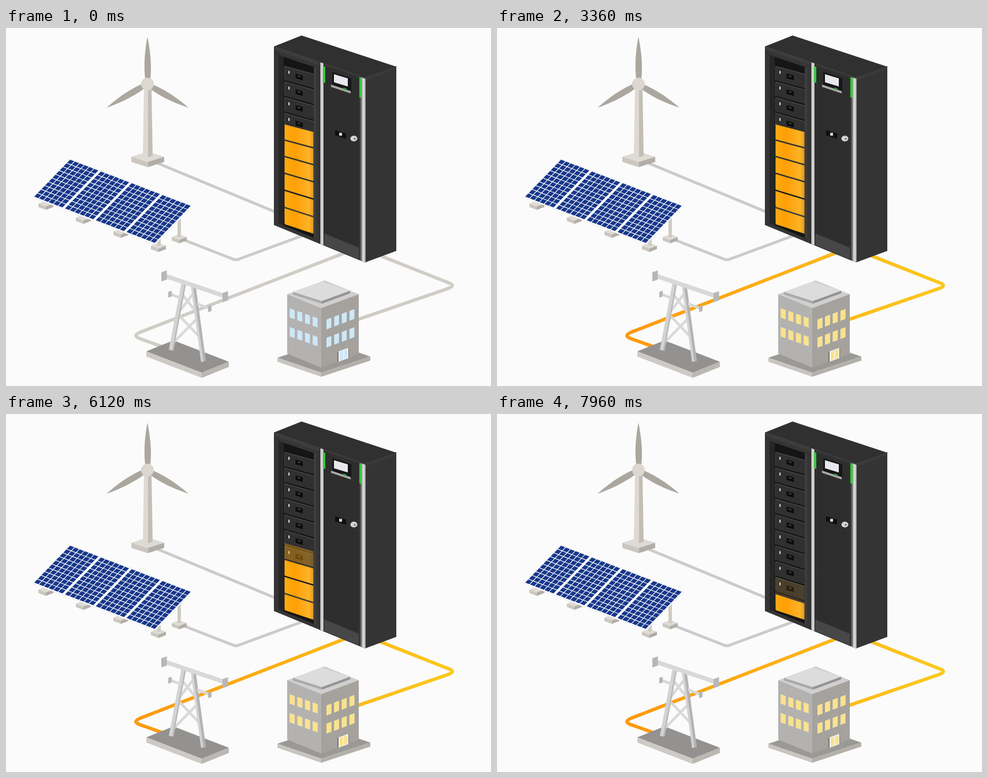
An HTML page for the animation above (8000 ms loop, 840x620 px).

```html
<!DOCTYPE html>
<html lang="en">
<head>
<meta charset="utf-8">
<title>Energy storage</title>
<style>
html, body { margin: 0; width: 100%; height: 100%; overflow: hidden; background: #fbfbfb; }
svg { display: block; width: 840px; height: 620px; }
</style>
</head>
<body>
<svg id="stage" viewBox="0 0 840 620" xmlns="http://www.w3.org/2000/svg">
  <defs>
    <linearGradient id="flow" gradientUnits="userSpaceOnUse" x1="222" y1="0" x2="774" y2="0">
      <stop offset="0" stop-color="#ff980a"/><stop offset="1" stop-color="#fcca1a"/>
    </linearGradient>
    <linearGradient id="charge">
      <stop offset="0" stop-color="#fbac12"/><stop offset=".35" stop-color="#ff9f06"/>
      <stop offset=".85" stop-color="#fdb327"/><stop offset="1" stop-color="#dc9a20"/>
    </linearGradient>
    <linearGradient id="post">
      <stop offset="0" stop-color="#8f8f8f"/><stop offset=".45" stop-color="#dedede"/><stop offset="1" stop-color="#b9b9b9"/>
    </linearGradient>
    <pattern id="mesh" width="3" height="3" patternUnits="userSpaceOnUse">
      <rect width="3" height="3" fill="#2a2a2a"/><rect width="1.5" height="1.5" fill="#383838"/>
    </pattern>
  </defs>
</svg>
<script>
const stage = document.getElementById('stage');

function add(tag, attrs, parent = stage) {
  const node = document.createElementNS('http://www.w3.org/2000/svg', tag);
  for (const key in attrs) node.setAttribute(key, attrs[key]);
  return parent.appendChild(node);
}
const poly = (points, fill, parent) => add('polygon', { points, fill }, parent);
const line = (d, stroke, width, more) =>
  add('path', { d, stroke, fill: 'none', 'stroke-width': width, ...more });

// Upright parallelogram whose top and bottom edges share a slope
const pane = (x, y, w, h, slope, fill, parent) =>
  poly([x, y, x + w, y + w * slope, x + w, y + w * slope + h, x, y + h], fill, parent);

// Box from the left, right and front corners of its top face
function slab([lx, ly], [rx, ry], [fx, fy], h, [top, left, right]) {
  poly([lx, ly, lx + rx - fx, ly + ry - fy, rx, ry, fx, fy], top);
  pane(lx, ly, fx - lx, h, (fy - ly) / (fx - lx), left);
  pane(fx, fy, rx - fx, h, (ry - fy) / (rx - fx), right);
}
const plinth = (x, y, w, d, h) =>
  slab([x - w, y], [x + w, y], [x, y + d], h, ['#dedad5', '#cbc7c0', '#b2aea7']);

function drawCables() {
  line('M255 231L470 320', '#cbcbcb', 5);
  line('M308 367L390 399Q397 403 404 400L515 359', '#cbcbcb', 5);
  return [
    'M593 387L232 527Q218 533 232 538L274 553',
    'M622 384L766 441Q780 446 766 451L603 507'
  ].map(d => {
    line(d, '#d0ccc6', 5.7);
    return line(d, 'url(#flow)', 5.7, { pathLength: 1, 'stroke-dasharray': '1 2' });
  });
}

function drawTurbine() {
  plinth(245.5, 223, 28.5, 9, 9);
  poly('239,104 246,104 246,224 237,221', '#dedad3');
  poly('246,104 252,104 254,221 246,224', '#c3beb5');
  for (const turn of [0, 120, 240]) {
    const blade = add('g', { transform: `rotate(${turn} 245 97)` });
    add('path', { d: 'M245 15C249 35 253 62 250 88H241C238 62 241 35 245 15Z', fill: '#aba79f' }, blade);
  }
  add('circle', { cx: 245, cy: 97, r: 11, fill: '#dcd7d0' });
}

function drawSolar() {
  for (let i = 0; i < 4; i++) plinth(69 + 65 * i, 304 + 24.3 * i, 13, 5, 6);
  plinth(300, 362, 13, 5, 6);
  pane(297, 320, 6, 42, 0, '#cfcbc4');
  pane(262, 356, 6, 21, 0, '#cfcbc4');

  // Unit square laid along the array's two edges
  const at = (u, v) => `${111 + 210 * u - 63 * v} ${228 + 80.5 * u + 65 * v}`;
  const quad = (u, v, du, dv) => `M${at(u, v)}L${at(u + du, v)}L${at(u + du, v + dv)}L${at(u, v + dv)}Z`;
  add('path', { d: quad(-.006, -.015, 1.012, 1.03), fill: '#fff', stroke: '#e2e2e2', 'stroke-width': .7 });
  const panels = 4, cols = 6, rows = 10, gap = .015, fill = .86;
  const du = ((1 + gap) / panels - gap) / cols, dv = 1 / rows;
  let cells = '';
  for (let p = 0; p < panels; p++)
    for (let c = 0; c < cols; c++)
      for (let r = 0; r < rows; r++)
        cells += quad(p * (1 + gap) / panels + c * du, r * dv, du * fill, dv * fill);
  add('path', { d: cells, fill: '#17378a' });
}

function drawPylon() {
  slab([243, 560], [386, 578], [339, 597], 9, ['#949290', '#cdcac5', '#bbb8b3']);
  line('M298 496L337 537M289 546L333 501M304 460L329 491M301 490L326 458', '#d9d9d9', 4.5);
  line('M308 441L286 558', '#d3d3d3', 8);
  line('M311 441L289 558', '#b9b9b9', 2.5);
  line('M322 444L340 578', '#d3d3d3', 4.5);
  line('M326 444L344 577', '#b3b3b3', 4.5);
  const arm = (x, y, w, h, slope, drops) => {
    pane(x, y, w, h, slope, '#d8d8d8');
    for (const dx of drops) pane(x + dx, y + dx * slope, h * 1.2, h * 2, -.35, '#b7b7b7');
  };
  arm(281, 457, 23, 5, .38, [0]);
  arm(331, 475, 25, 5, .38, [19]);
  arm(269, 423, 115, 8, .34, [0, 106]);
}

function drawBuilding() {
  slab([470, 571], [631, 569], [546, 597], 7, ['#9b9995', '#c8c5c0', '#b3b0aa']);
  slab([487, 461], [611, 461], [546, 485], 103, ['#cfcfcf', '#b3b2b1', '#a5a29e']);
  slab([497, 457], [596, 455], [547, 473], 4.5, ['#dcdcdc', '#aaaaaa', '#949494']);
  pane(574, 561, 20, 17, -.37, '#77746f');
  pane(576, 560, 17, 18, -.37, '#f2f4f5');
  const windows = (color, parent) => {
    for (let c = 0; c < 4; c++)
      for (let r = 0; r < 2; r++) {
        pane(491.5 + 13.2 * c, 485.5 + 4.7 * c + 32.5 * r, 8.5, 16, .34, color, parent);
        pane(555 + 13.3 * c, 505 - 5 * c + 31.5 * r, 8.5, 17, -.37, color, parent);
      }
    for (let d = 0; d < 2; d++) pane(578 + 7.5 * d, 561 - 2.8 * d, 6, 15, -.37, color, parent);
  };
  windows('#cde8f8');
  const lit = add('g', {});
  windows('#fbe28b', lit);
  return lit;
}

function drawModules() {
  for (let i = 0; i < 10; i++) {
    const y = 85 + 27.2 * i, slope = .27 + .006 * i;
    pane(482, y - 12.5 - 26 * slope, 51, 24.5, slope, '#474747');
    pane(483, y - 11 - 25 * slope, 50, 23, slope, '#303030');
    pane(489, y - 11, 2.2, 5, slope, '#d4d4d4');
    pane(501.5, y - 6, 12.5, 8, slope, '#0c0c0c');
    pane(505, y - 3, 5, 2, slope, '#444');
  }
  // Charged blocks grow slightly towards the floor
  const left = i => 167 + 28 * i + .2 * i * i;
  const right = i => left(i) + 13 + .6 * i;
  return Array.from({ length: 6 }, (_, i) =>
    poly([482.5, left(i), 532.5, right(i), 532.5, right(i + 1) - 2.5, 482.5, left(i + 1) - 2.5], 'url(#charge)'));
}

function drawCabinet() {
  const top = x => 32 + .34 * (x - 464), bottom = x => 341 + .411 * (x - 464);
  // Front strip from x0 to x1, inset from the cabinet's upper and lower edges
  const strip = (x0, x1, upper, lower, fill) =>
    poly([x0, top(x0) + upper, x1, top(x1) + upper, x1, bottom(x1) - lower, x0, bottom(x0) - lower], fill);

  strip(464, 622, 0, 0, '#2d2d2d');
  pane(622, 86, 54, 320, -.37, '#343434');
  poly('464,32 512,13 676,67 622,86', '#303030');
  pane(464, 32, 158, 6, .34, '#3c3c3c');
  pane(622, 86, 54, 5, -.37, '#3a3a3a');

  strip(464, 544, 6, 0, '#353535');
  strip(472, 537, 12, 6, '#151515');
  strip(472, 481, 12, 6, '#262626');
  const blocks = drawModules();
  strip(533, 537, 12, 6, '#3d3d3d');

  strip(543, 551, 0, 0, '#1d1d1d');
  strip(544, 550, 0, 0, 'url(#post)');
  strip(551, 613, 2, 0, '#303030');
  pane(551, bottom(551) - 21, 60, 20, .411, '#474747');
  strip(553, 610, 6, 22, 'url(#mesh)');
  strip(613, 623, 2, 0, '#585858');
  strip(615.5, 622.5, 2, 0, 'url(#post)');
  pane(549, 66, 4, 28, .34, '#35c83a');
  pane(612, 85, 4, 35, .34, '#35c83a');

  pane(565, 76, 33, 24, .33, '#161616');
  pane(568, 80, 24, 14, .3, '#e6e8ee');
  pane(563, 98, 34, 4, .33, '#a9a9a9');
  pane(584, 103, 6, 3, .33, '#2f9f42');

  pane(570, 177, 19, 9, .3, '#0f0f0f');
  add('rect', { x: 577, y: 181.5, width: 5, height: 5, fill: '#d8d8d8' });
  add('ellipse', { cx: 602.5, cy: 191.5, rx: 6, ry: 5, fill: '#d6d6d6' });
  add('circle', { cx: 604, cy: 192, r: 1.8, fill: '#777' });
  return blocks;
}

const cables = drawCables();
drawTurbine();
drawSolar();
const blocks = drawCabinet();
drawPylon();
const litWindows = drawBuilding();

const LOOP = 8000;
const ramp = (t, start, span) => Math.min(1, Math.max(0, (t - start) / span));

function render(t) {
  const flow = ramp(t, 120, 3240);
  for (const cable of cables) {
    cable.setAttribute('stroke-dashoffset', 1 - flow);
    cable.setAttribute('visibility', flow > 0 ? 'visible' : 'hidden');
  }
  litWindows.setAttribute('opacity', ramp(t, 2880, 480));
  blocks.forEach((block, i) => block.setAttribute('opacity', 1 - ramp(t, 4100 + 838 * i, 580)));
}

const began = performance.now();
function tick() {
  render((performance.now() - began) % LOOP);
  requestAnimationFrame(tick);
}
tick();
</script>
</body>
</html>
```
